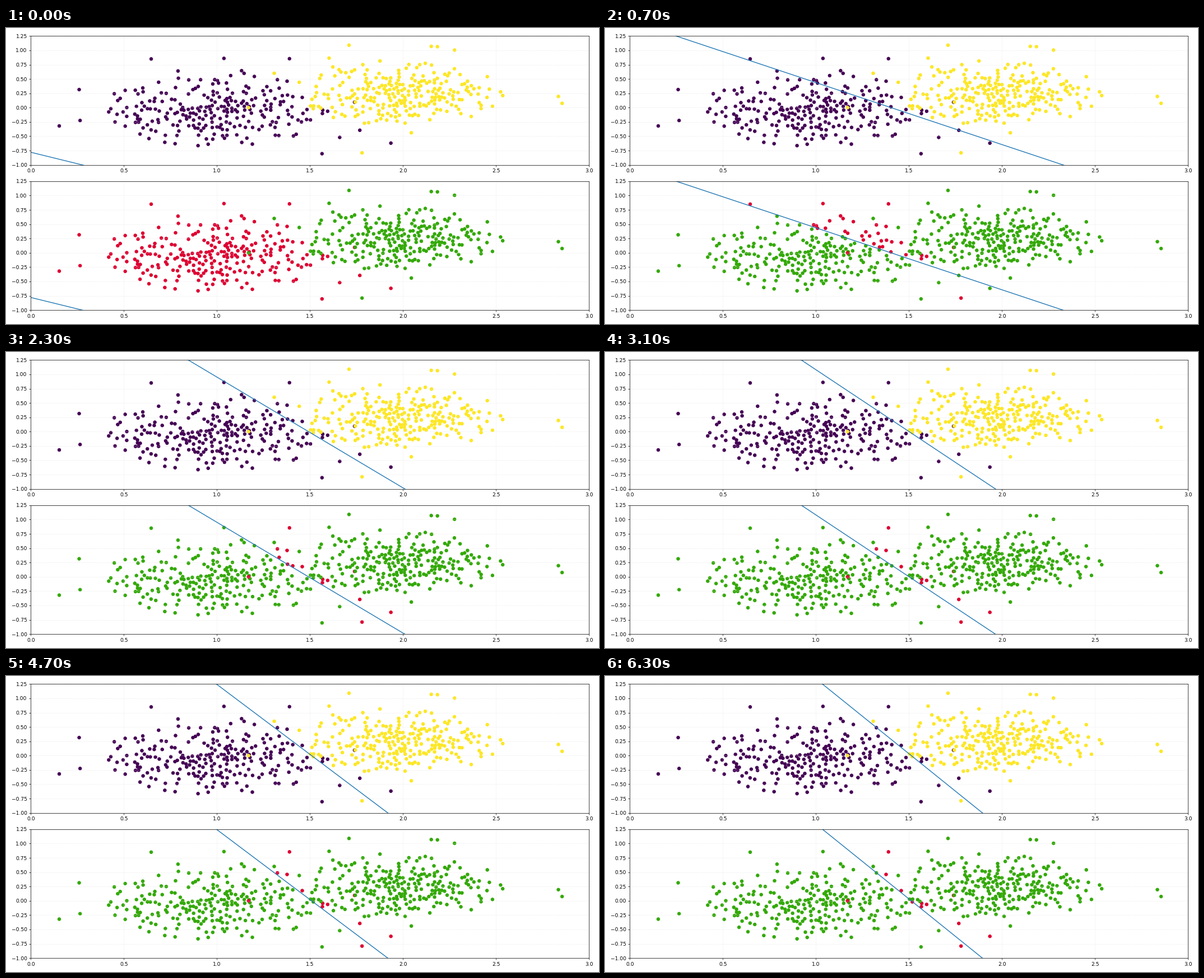
Write a matplotlib script that moves like this. It is 1058 px wide and 529 px high and loops after 6400 ms.

```python
import numpy as np
import matplotlib.pyplot as plt
from matplotlib.animation import FuncAnimation

W, H, DPI = 1058, 529, 66.125
FRAMES, INTERVAL = 64, 100
LEFT, RIGHT = 44.2, 1040.3
PURPLE, YELLOW = "#440154", "#fde725"
RED, GREEN = "#dd0031", "#33a907"

PX_PER_UNIT = np.array([332, 102])
MIN_GAP = 4.5  # pixels between dots of one cloud
REACH = 2.15   # cloud radius in standard deviations

STRAYS_A = [(.153, -.32), (.26, .315), (.265, -.225), (.647, .85),
            (1.038, .86), (1.39, .855), (1.565, -.805), (1.66, -.52),
            (1.935, -.62), (1.768, -.395), (1.74, .095)]
STRAYS_B = [(1.71, 1.09), (2.152, 1.07), (2.185, 1.065), (2.277, 1.005),
            (1.603, .865), (1.78, -.79), (2.045, -.44), (2.835, .195),
            (2.855, .075), (1.17, 0), (1.308, .6)]


def cloud(rng, strays, count, mean, sd):
    """Normal cloud around mean, evenly spread, added to the strays."""
    pts = list(np.array(strays))
    while len(pts) < count:
        z = rng.normal(size=2)
        p = np.array(mean) + z * sd
        gaps = np.hypot(*((np.array(pts) - p) * PX_PER_UNIT).T)
        if np.hypot(*z) < REACH and gaps.min() > MIN_GAP:
            pts.append(p)
    return np.array(pts)


rng = np.random.default_rng(7)
a = cloud(rng, STRAYS_A, 250, (.99, .0), (.31, .32))
b = cloud(rng, STRAYS_B, 250, (1.99, .27), (.27, .27))
points = np.vstack([a, b])
labels = np.repeat([False, True], [len(a), len(b)])


def boundary(step):
    """Zero crossing and tilt of the line x = cross - tilt * y."""
    r = 1 / (step + 1)
    cross = np.polyval([.885, -2.76, -.624, 1.5232], r)
    tilt = np.polyval([-2.04, -2.32, 5.312, .2995], r)
    return cross, tilt


def panel(top, bottom):
    ax = fig.add_axes([LEFT / W, 1 - bottom / H,
                       (RIGHT - LEFT) / W, (bottom - top) / H])
    ax.set(xlim=(0, 3), ylim=(-1, 1.25),
           xticks=np.arange(0, 3.1, .5), yticks=np.arange(-1, 1.3, .25))
    ax.grid(color="#e0e0e0", linestyle=":", linewidth=.8)
    dots = ax.scatter(*points.T, c=np.where(labels, YELLOW, PURPLE))
    line, = ax.plot([], [], color="#1f77b4", linewidth=1.5)
    return dots, line


fig = plt.figure(figsize=(W / DPI, H / DPI), dpi=DPI, facecolor="white")
_, line_top = panel(14.4, 244.6)
dots, line_bottom = panel(273.9, 504.1)
xs = np.array([0, 3])


def update(step):
    cross, tilt = boundary(step)
    for line in (line_top, line_bottom):
        line.set_data(xs, (cross - xs) / tilt)
    guess = points @ (1, tilt) > cross
    dots.set_color(np.where(guess == labels, GREEN, RED))
    return line_top, line_bottom, dots


anim = FuncAnimation(fig, update, frames=FRAMES, interval=INTERVAL,
                     repeat=True, repeat_delay=0)
plt.show()
```
